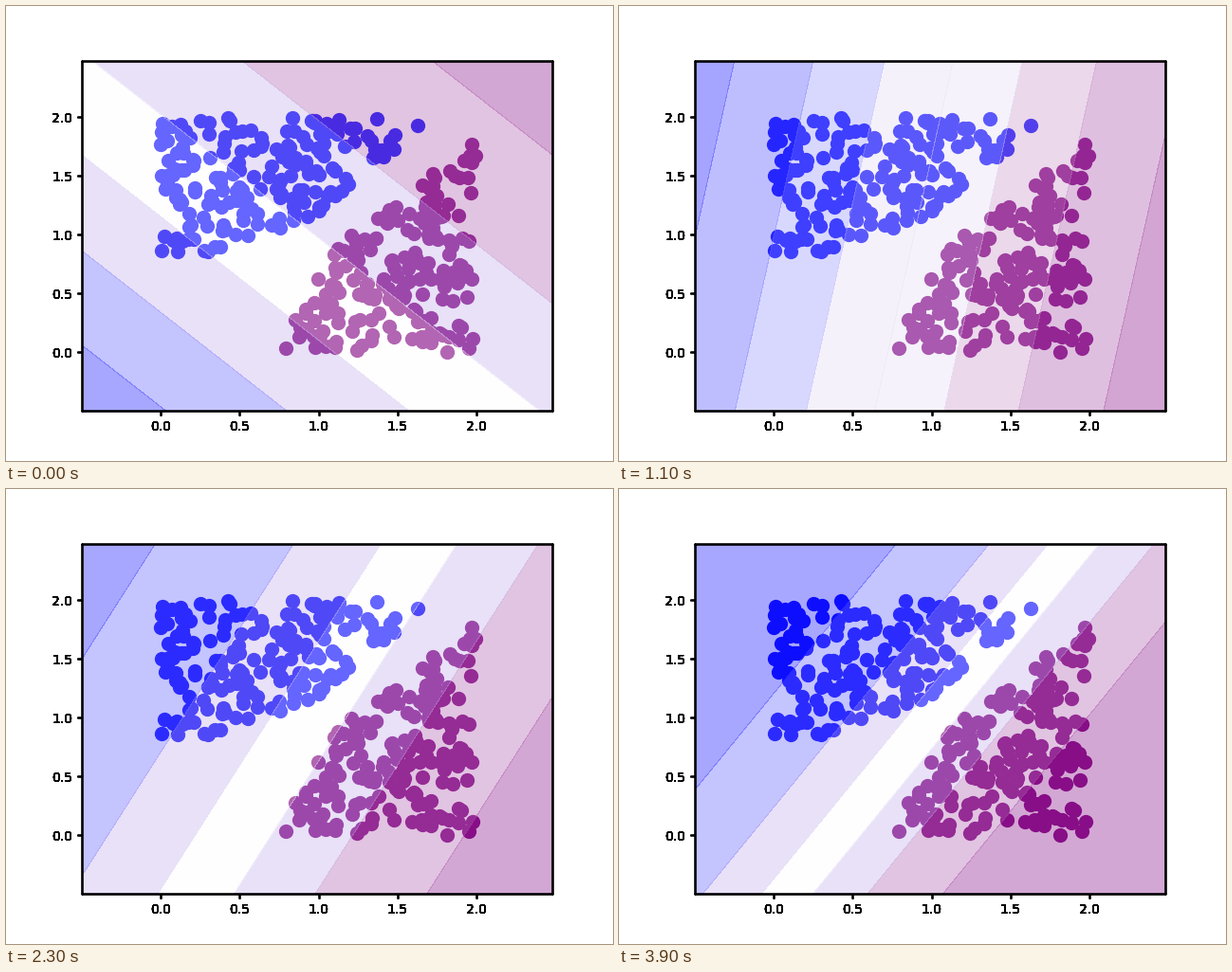
Recreate the animation shown at these times as a matplotlib script. Size 640x480 px, loop 4000 ms.

```python
import numpy as np
import matplotlib.pyplot as plt
from matplotlib.animation import FuncAnimation
from matplotlib.colors import LinearSegmentedColormap

FRAMES = 40
LOW, HIGH = -0.5, 2.48
BLUE, PURPLE = (0, 0, 1), (0.5, 0, 0.5)
LAYERS = 12  # stacked axes give the heavy labels and borders

# Logistic model (x weight, y weight, bias): a quick and a slow part of learning
START = np.array([-0.42, -0.40, 0.055])
QUICK = np.array([0.203, 0.033, 0.037])
SLOW = np.array([-5.72, 4.34, 0.857])
RATE = np.array([0.0087, 0.0109, 0.05])

plt.rcParams.update({
    "font.family": "DejaVu Sans",
    "axes.linewidth": 0.9,
    "xtick.major.width": 0.9,
    "ytick.major.width": 0.9,
})
rng = np.random.default_rng(5)


def weights_at(step):
    return START + QUICK * (1 - np.exp(-0.5 * step)) + SLOW * (1 - np.exp(-RATE * step))


def cloud(count):
    """Random points (near, far) on one side of the diagonal, off the corner."""
    near, far = rng.uniform(0, 2, (2, 20 * count))
    keep = far > np.maximum(near + 0.2, 0.7 + 0.47 * near)
    return near[keep][:count], far[keep][:count]


def tint(color, amount):
    return tuple(1 - amount * (1 - c) for c in color)


lavender = tuple(np.mean([tint(BLUE, 0.286), tint(PURPLE, 0.286)], axis=0))
cmap = LinearSegmentedColormap.from_list("sides", [
    (0, PURPLE), (0.32, tint(PURPLE, 0.36)), (0.357, lavender), (0.5, (1, 1, 1)),
    (0.643, lavender), (0.68, tint(BLUE, 0.36)), (1, BLUE),
])

fig = plt.figure(figsize=(6.4, 4.8), dpi=100)
ax = fig.add_subplot(xlim=(LOW, HIGH), ylim=(LOW, HIGH))
ax.set_axis_off()

near, far = cloud(185)
ax.scatter(near, far, s=100, color=[BLUE], linewidths=1)
near, far = cloud(180)
ax.scatter(far, near, s=100, color=[PURPLE], linewidths=1)

ticks = np.arange(0, 2.1, 0.5)
for layer in range(LAYERS):
    fig.add_axes(ax.get_position(), facecolor="none", label=f"layer {layer}",
                 xlim=(LOW, HIGH), ylim=(LOW, HIGH), xticks=ticks, yticks=ticks)

grid = np.linspace(LOW, HIGH, 150)
gx, gy = np.meshgrid(grid, grid)
bands = None


def update(step):
    global bands
    if bands is not None:
        bands.remove()
    wx, wy, bias = weights_at(step)
    prob = 1 / (1 + np.exp(-(wx * gx + wy * gy + bias)))
    bands = ax.contourf(gx, gy, prob, cmap=cmap, alpha=0.4)
    return [bands]


anim = FuncAnimation(fig, update, frames=FRAMES, interval=100, repeat=True, blit=False)
plt.show()
```
